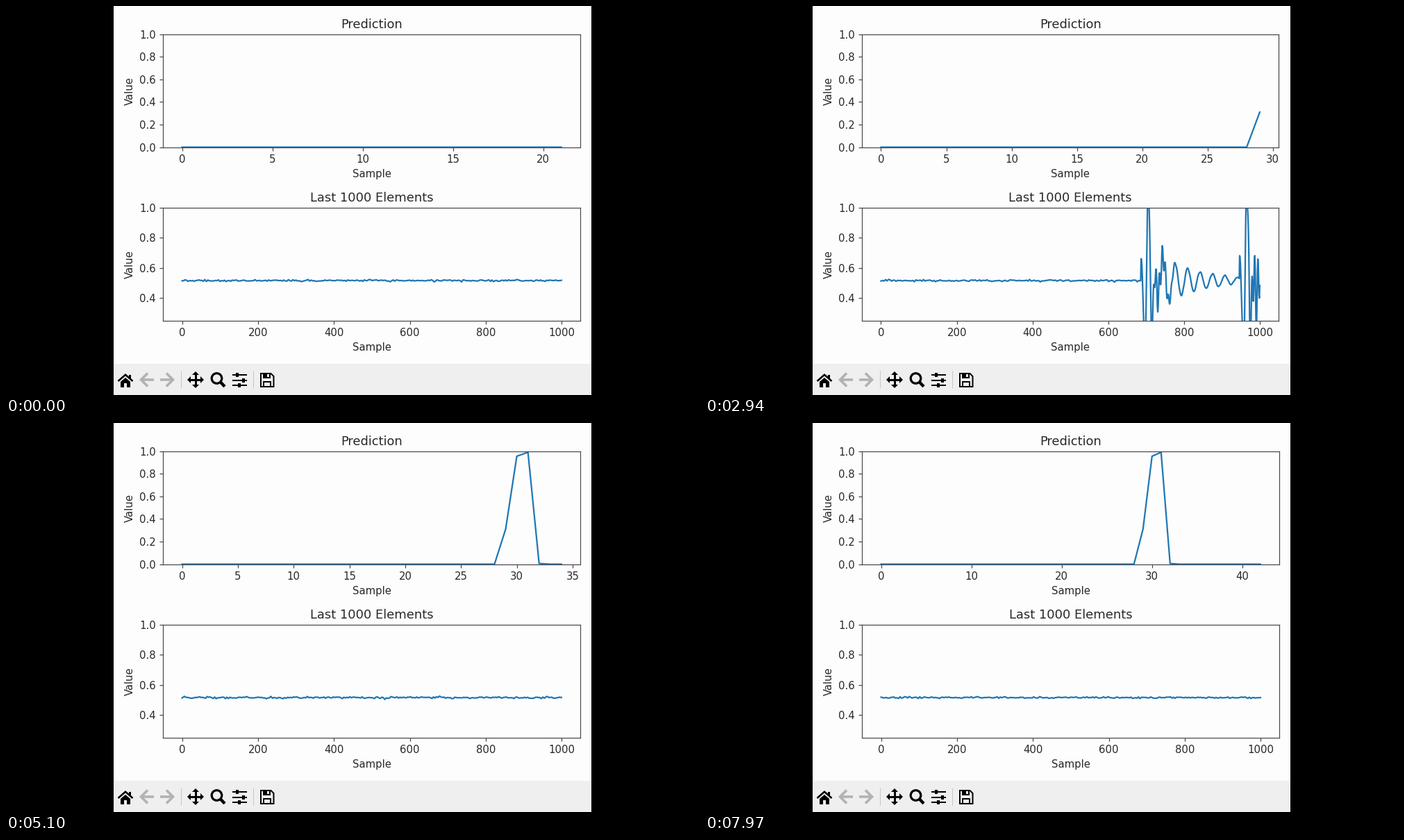
These frames come from a looping animation (998x561 px, 8 s). A matplotlib script:

```python
import numpy as np
import matplotlib.pyplot as plt
from matplotlib.animation import FuncAnimation
from matplotlib.patches import Circle, Polygon, Rectangle

W, H, DPI = 998, 561, 100
INTERVAL, FRAMES = 40, 200
SCALE = 1.075  # a 640 x 480 window shown 688 px wide
INK, SPINE, BLUE = "#28282a", "#44444c", "#1f77b4"
PAPER, BAR, FADED = "#fdfdfd", "#efeff0", "#b2b2b2"

plt.rcParams.update({
    "font.family": "DejaVu Sans", "font.size": 10 * SCALE,
    "text.color": INK, "axes.labelcolor": INK, "axes.edgecolor": SPINE,
    "axes.facecolor": PAPER, "axes.linewidth": 0.8 * SCALE,
    "axes.titlepad": 6 * SCALE, "axes.labelpad": 4 * SCALE,
    "lines.linewidth": 1.5 * SCALE,
})
for side in ("xtick", "ytick"):
    plt.rcParams.update({f"{side}.color": SPINE, f"{side}.labelcolor": INK,
                         f"{side}.major.size": 3.5 * SCALE,
                         f"{side}.major.pad": 3.5 * SCALE,
                         f"{side}.major.width": 0.8 * SCALE})

# A new prediction arrives every PERIOD ms and moves the stream on by STEP
FIRST, LAST, START, PERIOD = 21, 42, 40, 390
STEP, WINDOW, REST = 298, 1000, 0.515
PREDICTION = np.zeros(LAST + 1)
PREDICTION[29:33] = 0.31, 0.955, 0.99, 0.006

# Plot area in pixels
LEFT, RIGHT, LABEL_HALF = 226.2, 827.2, 9.5


def wave(t, peak, period):
    return np.cos(2 * np.pi * (t - peak) / period)


def bell(t, center, width):
    return np.exp(-((t - center) / width) ** 2)


def knock(t, rattle):
    """One hit on the sensor: a slam, a fast rattle and a long ringing."""
    slam = 0.6 * bell(t, 19, 16) * wave(t, 19, 20)
    buzz = rattle * bell(t, 45, 28) * wave(t, 56, 8)
    ring = 0.28 * np.exp(-t / 100) * np.clip(t / 60, 0, 1) * wave(t, 123, 32.8)
    return np.where(t >= 0, slam + buzz + ring, 0)


def make_stream():
    idx = np.arange((LAST - FIRST) * STEP + WINDOW)
    knots = np.arange(0, len(idx) + 4, 4)
    rng = np.random.default_rng(4)
    noise = np.interp(idx, knots, rng.normal(0, 0.003, len(knots)))
    return REST + noise + knock(idx - 3070.0, 0.1) + knock(idx - 3330.0, 0.2)


def draw_window(ax):
    def line(points, color="black", width=2.0):
        ax.plot(*zip(*points), color=color, lw=width * 72 / DPI,
                solid_capstyle="butt", solid_joinstyle="miter")

    def shape(points, color="black"):
        ax.add_patch(Polygon(points, fc=color, ec="none"))

    def box(x, y, w, h, color="black"):
        ax.add_patch(Rectangle((x, y), w, h, fc=color, ec="none"))

    box(155, 0, 688, 516, PAPER)
    box(155, 516, 688, 45, BAR)

    # Home
    line([(161.5, 541), (172, 531.8), (182.5, 541)], width=2.6)
    box(177, 531.5, 3, 6)
    shape([(165, 542), (172, 536), (179, 542), (179, 550), (165, 550)])
    box(170, 544, 4, 6, BAR)
    # Back and forward
    for tip, d in ((193.5, 1), (241.5, -1)):
        line([(tip + d, 539), (tip + 19.5 * d, 539)], FADED, 3.6)
        line([(tip + 10.5 * d, 529.5), (tip + d, 539), (tip + 10.5 * d, 548.5)],
             FADED, 3.6)
    for x in (252.5, 356.5):
        line([(x, 526), (x, 551)], "#c6c6c8", 1)
    # Pan
    cx, cy = 273, 539
    for dx, dy in ((1, 0), (-1, 0), (0, 1), (0, -1)):
        line([(cx, cy), (cx + 9 * dx, cy + 9 * dy)], width=3)
        shape([(cx + 12 * dx, cy + 12 * dy),
               (cx + 7 * dx + 5 * dy, cy + 7 * dy + 5 * dx),
               (cx + 7 * dx - 5 * dy, cy + 7 * dy - 5 * dx)])
    # Zoom
    ax.add_patch(Circle((303.5, 537), 7.3, fc="none", ec="black", lw=3.2 * 72 / DPI))
    line([(308.5, 542), (315, 548.8)], width=4.4)
    # Subplot sliders
    for y, knob in ((532, 333), (539.5, 342), (546.5, 336)):
        line([(326, y), (347.5, y)])
        box(knob - 3.5, y - 3, 7, 6, BAR)
        box(knob - 2.2, y - 3, 4.4, 6)
    # Save
    line([(367, 530), (381.5, 530), (385.5, 534), (385.5, 549), (367, 549),
          (367, 529)])
    box(370, 529, 11, 7.5)
    box(376.5, 530.5, 3, 4.5, BAR)
    line([(371, 549), (371, 541.5), (381.5, 541.5), (381.5, 549)])

    ax.set(xlim=(0, W), ylim=(H, 0))
    ax.axis("off")


def place(ax, width, top, bottom):
    ax.set_position([LEFT / W, 1 - bottom / H, width / W, (bottom - top) / H])


def plot_width(last):
    """Narrow the plots when the last tick label would overhang the margin."""
    last_tick = 5 * (1.05 * last // 5)
    share = (last_tick + 0.05 * last) / (1.1 * last)
    return min(RIGHT - LEFT, (RIGHT - LABEL_HALF - LEFT) / share)


fig = plt.figure(figsize=(W / DPI, H / DPI), dpi=DPI, facecolor="black")
draw_window(fig.add_axes([0, 0, 1, 1], zorder=-1))

top_ax = fig.add_axes([0.2, 0.6, 0.6, 0.3])
low_ax = fig.add_axes([0.2, 0.2, 0.6, 0.3])
top_ax.set(title="Prediction", xlabel="Sample", ylabel="Value", ylim=(0, 1))
low_ax.set(title="Last 1000 Elements", xlabel="Sample", ylabel="Value",
           xlim=(-49.95, 1048.95), ylim=(0.25, 1))
top_line, = top_ax.plot([], [], color=BLUE, snap=False)
low_line, = low_ax.plot([], [], color=BLUE, snap=False)
STREAM = make_stream()


def update(frame):
    now = (frame + 0.5) * INTERVAL
    count = int((now - START) // PERIOD) + 1
    last = FIRST + count
    width = plot_width(last)
    place(top_ax, width, 40.6, 203.6)
    place(low_ax, width, 290.6, 453.6)
    top_line.set_data(np.arange(last + 1), PREDICTION[:last + 1])
    top_ax.set_xlim(-0.05 * last, 1.05 * last)
    low_line.set_data(np.arange(WINDOW), STREAM[count * STEP:count * STEP + WINDOW])
    return top_line, low_line


anim = FuncAnimation(fig, update, frames=FRAMES, interval=INTERVAL,
                     repeat=True, repeat_delay=0, blit=False)
plt.show()
```
